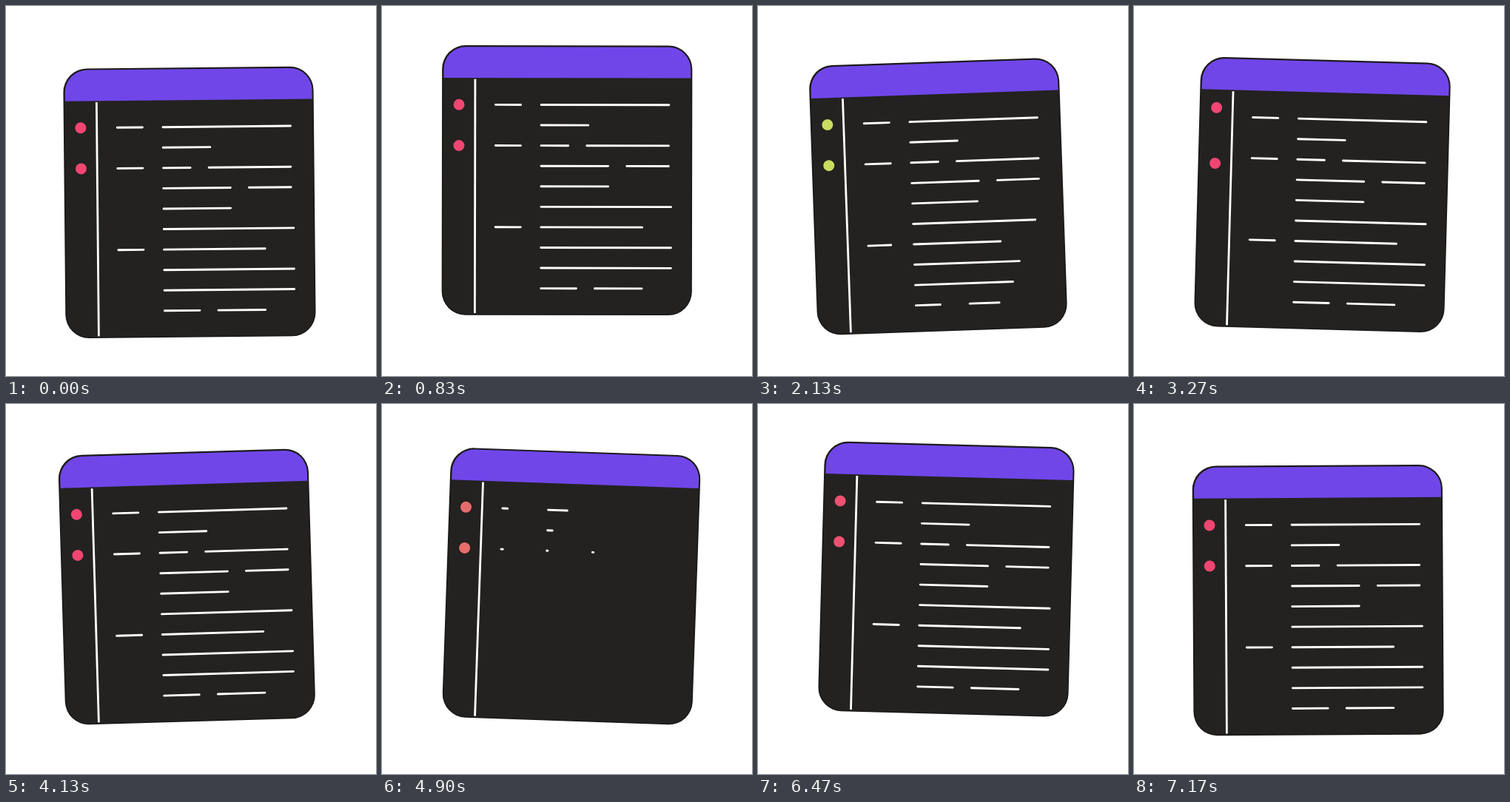
Write an HTML page with a canvas that moves like this. It is 500x500 px and loops after 7.21 s.

```html
<!DOCTYPE html>
<html lang="en">
<head>
<meta charset="utf-8">
<title>Code window</title>
<style>
  html, body { margin: 0; width: 100%; height: 100%; overflow: hidden; background: #fff; }
  canvas { display: block; width: 500px; height: 500px; }
</style>
</head>
<body>
<canvas id="stage" width="500" height="500"></canvas>
<script>
const ctx = document.getElementById('stage').getContext('2d');
const LOOP = 7210, FPS = 30, CYCLE = 108, SWING = 54;
const BASE = 417, ROW = 133.3, STEP = 27.57;
const LABEL_X = 152.3, LABEL_W = 35.5, CODE_X = 214, GAP = 23.7;
const PINK = [241, 70, 114], GREEN = [202, 220, 96];

// word widths per row; some rows also carry a label on the left
const ROWS = [[174], [65], [38, 112], [92, 58], [92], [177], [138], [177], [177], [49, 65]];
const LABELLED = [0, 2, 6];

const clamp = v => Math.min(1, Math.max(0, v));
const smooth = (a, b, v) => { const u = clamp((v - a) / (b - a)); return u * u * (3 - 2 * u); };
const swing = (f, zero) => 2 * Math.PI * (f - zero) / SWING;

function layout() {
  const words = [];
  ROWS.forEach((widths, row) => {
    const y = ROW + STEP * row;
    if (LABELLED.includes(row)) words.push({ x: LABEL_X, y, w: LABEL_W });
    let x = CODE_X;
    for (const w of widths) {
      words.push({ x, y, w });
      x += w + GAP;
    }
  });
  return words;
}
const WORDS = layout();

function stroke(x1, y1, x2, y2, width) {
  ctx.lineWidth = width;
  ctx.beginPath();
  ctx.moveTo(x1, y1);
  ctx.lineTo(x2, y2);
  ctx.stroke();
}

function panel(color, x, y, w, h, r) {
  ctx.fillStyle = color;
  ctx.beginPath();
  ctx.roundRect(x, y, w, h, r);
  ctx.fill();
}

function drawWindow() {
  panel('#1b1a1b', 80.6, 53, 338.2, 364.6, 32);
  panel('#232220', 82.5, 55, 334.5, 361, 30);
  panel('#7046e9', 83, 55.2, 333.7, 41.8, [30, 30, 0, 0]);
  ctx.strokeStyle = '#fff';
  ctx.lineCap = 'butt';
  stroke(125.4, 98.8, 125.4, 415, 2.8);
}

function drawWords(f) {
  const wiped = 1 - smooth(25, 32, f);
  ctx.lineCap = 'round';
  WORDS.forEach(({ x, y, w }, i) => {
    const start = 31.5 + 1.15 * i;
    const part = Math.max(wiped, smooth(start, start + 26, f));
    if (part > 0.005) stroke(x + 0.7, y, x + 0.7 + (w - 1.4) * part, y, 2.9);
  });
}

function drawDots(f) {
  const mix = smooth(37, 43, f) - smooth(81, 87, f);
  const rgb = PINK.map((c, i) => Math.round(c + (GREEN[i] - c) * mix));
  const hop = Math.sin(Math.PI * clamp((f - 90) / 16)) ** 2;
  ctx.fillStyle = `rgb(${rgb})`;
  for (const [row, shift] of [[0, -11.8], [2, 8.3]]) {
    ctx.beginPath();
    ctx.arc(103.6, ROW + STEP * row + shift * hop, 7.5, 0, 2 * Math.PI);
    ctx.fill();
  }
}

function draw() {
  const t = performance.now() % LOOP;
  const f = Math.min(2 * CYCLE - 1, Math.floor((t + 5) * FPS / 1000)) % CYCLE;
  const y = 431.8 - 15.3 * Math.cos(swing(f, 27.7));
  const angle = 2 * Math.sin(swing(f, 24.6)) * Math.PI / 180;

  ctx.setTransform(1, 0, 0, 1, 0, 0);
  ctx.fillStyle = '#fff';
  ctx.fillRect(0, 0, 500, 500);
  ctx.translate(250, y);
  ctx.rotate(angle);
  ctx.translate(-250, -BASE);
  drawWindow();
  drawWords(f);
  drawDots(f);
  requestAnimationFrame(draw);
}
draw();
</script>
</body>
</html>
```
